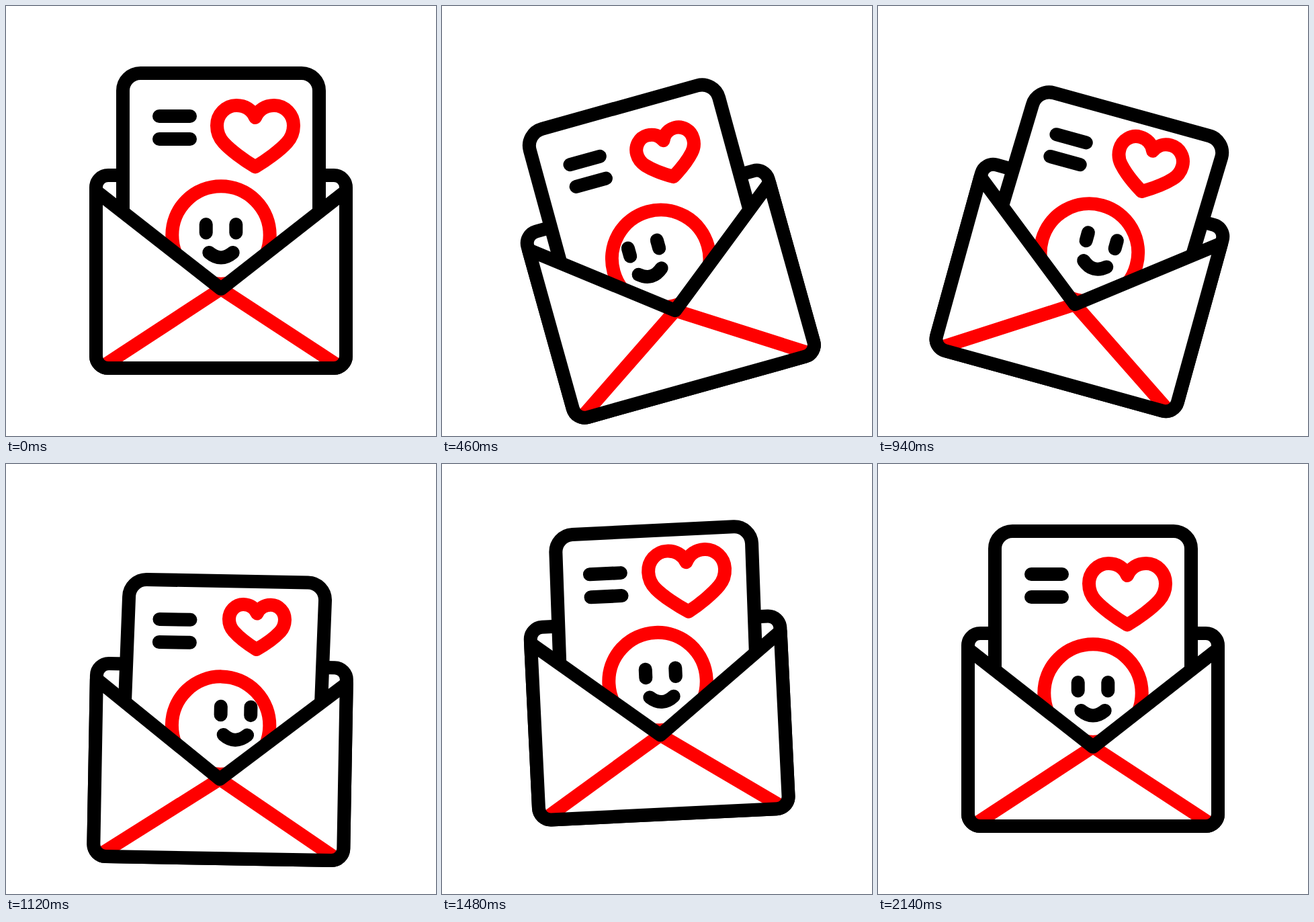
These frames come from a looping animation (640x640 px, 2400 ms). An HTML page:

```html
<!DOCTYPE html>
<html lang="en">
<head>
<meta charset="utf-8">
<title>Love letter</title>
<style>
  html, body { margin: 0; width: 100%; height: 100%; overflow: hidden; background: #fff; }
  svg { display: block; width: 100%; height: 100%; }
  .ink { stroke: #000; }
  .red { stroke: #f00; }
  .paper { fill: #fff; }
</style>
</head>
<body>
<svg viewBox="0 0 640 640" fill="none" stroke-width="20" stroke-linecap="round" stroke-linejoin="round">
  <g id="all">
    <rect class="ink paper" x="134" y="252" width="372" height="287" rx="18"/>
    <path id="sheet" class="paper"/>
    <path id="heart" class="red" d="M0 -27.5C-5 -39 -15 -45.5 -28 -45.5C-44 -45.5 -57 -32 -57 -15.5C-57 -6 -53.5 3 -47 10C-37 21 -17 36 0 46C17 36 37 21 47 10C53.5 3 57 -6 57 -15.5C57 -32 44 -45.5 28 -45.5C15 -45.5 5 -39 0 -27.5Z"/>
    <path id="lines" class="ink" d="M228 164H274M228 198H274"/>
    <circle class="red" cx="320" cy="341" r="72.7"/>
    <path id="face" class="ink" d="M297.7 325V337.5M342.3 325V337.5M302.3 367Q320 382 337.7 367"/>
    <path id="border" class="ink"/>
    <path class="paper" d="M134 275.5L320 421L506 275.5V521A18 18 0 0 1 488 539H152A18 18 0 0 1 134 521Z"/>
    <path class="red" stroke-linecap="butt" d="M146 535L320 421L494 535"/>
    <path class="ink" d="M134 275.5L320 421L506 275.5V521A18 18 0 0 1 488 539H152A18 18 0 0 1 134 521Z"/>
  </g>
</svg>
<script>
const LOOP = 2400, STEP = 20, END = 2133, BEAT = END / 6;
const byId = id => document.getElementById(id);
const all = byId('all'), sheet = byId('sheet'), border = byId('border');
const heart = byId('heart'), lines = byId('lines'), face = byId('face');

// Keys are [time, value] pairs, eased in and out between neighbours.
const tilt = [[0, 0], [368, -18.2], [910, 15.9], [1272, -8.1], [1722, 3.9], [END, 0]];
const bounce = [0, 55, -36.5, 52.5, -20, 15.8, 0].map((y, i) => [i * BEAT, y]);
const pulse = [1, .65, 1.19, .71, 1].map((s, i) => [i * BEAT, s]);
const tuck = [[320, 0], [720, 1], [1280, 1], [1770, 0]];
const lookX = [[0, 0], [420, -20.5], [640, -20.5], [1067, 22], [1195, 22], [1605, 0]];
const lookY = [[0, 0], [420, -12.2], [1195, -12.2], [1605, 0]];

function at(keys, t) {
  const next = keys.findIndex(key => key[0] > t);
  if (next < 0) return keys[keys.length - 1][1];
  if (next === 0) return keys[0][1];
  const [t0, a] = keys[next - 1], [t1, b] = keys[next];
  const u = (t - t0) / (t1 - t0);
  return a + (b - a) * u * u * (3 - 2 * u);
}

// The foot of the sheet stays in the envelope while its top edge shifts.
function sheetPath(dx, dy) {
  const left = 174 + dx, right = 466 + dx, top = 100 + dy, r = 26;
  return `M174 440L${left} ${top + r}A${r} ${r} 0 0 1 ${left + r} ${top}` +
    `H${right - r}A${r} ${r} 0 0 1 ${right} ${top + r}L466 440`;
}

function move(el, x, y, rest = '') {
  el.setAttribute('transform', `translate(${x} ${y}) ${rest}`);
}

function draw(t) {
  const down = at(tuck, t), scale = at(pulse, t);
  move(all, 0, at(bounce, t), `rotate(${at(tilt, t)} 320 320)`);
  const path = sheetPath(6 * down, 26 * down);
  sheet.setAttribute('d', path);
  border.setAttribute('d', path);
  move(lines, -2 * down, 20.6 * down);
  move(heart, 371, 193.5, `scale(${scale})`);
  heart.setAttribute('stroke-width', 20 / scale);
  move(face, at(lookX, t), at(lookY, t));
}

const start = performance.now();
function tick() {
  const t = (performance.now() - start) % LOOP;
  draw(Math.floor(t / STEP) * STEP);
  requestAnimationFrame(tick);
}
tick();
</script>
</body>
</html>
```
